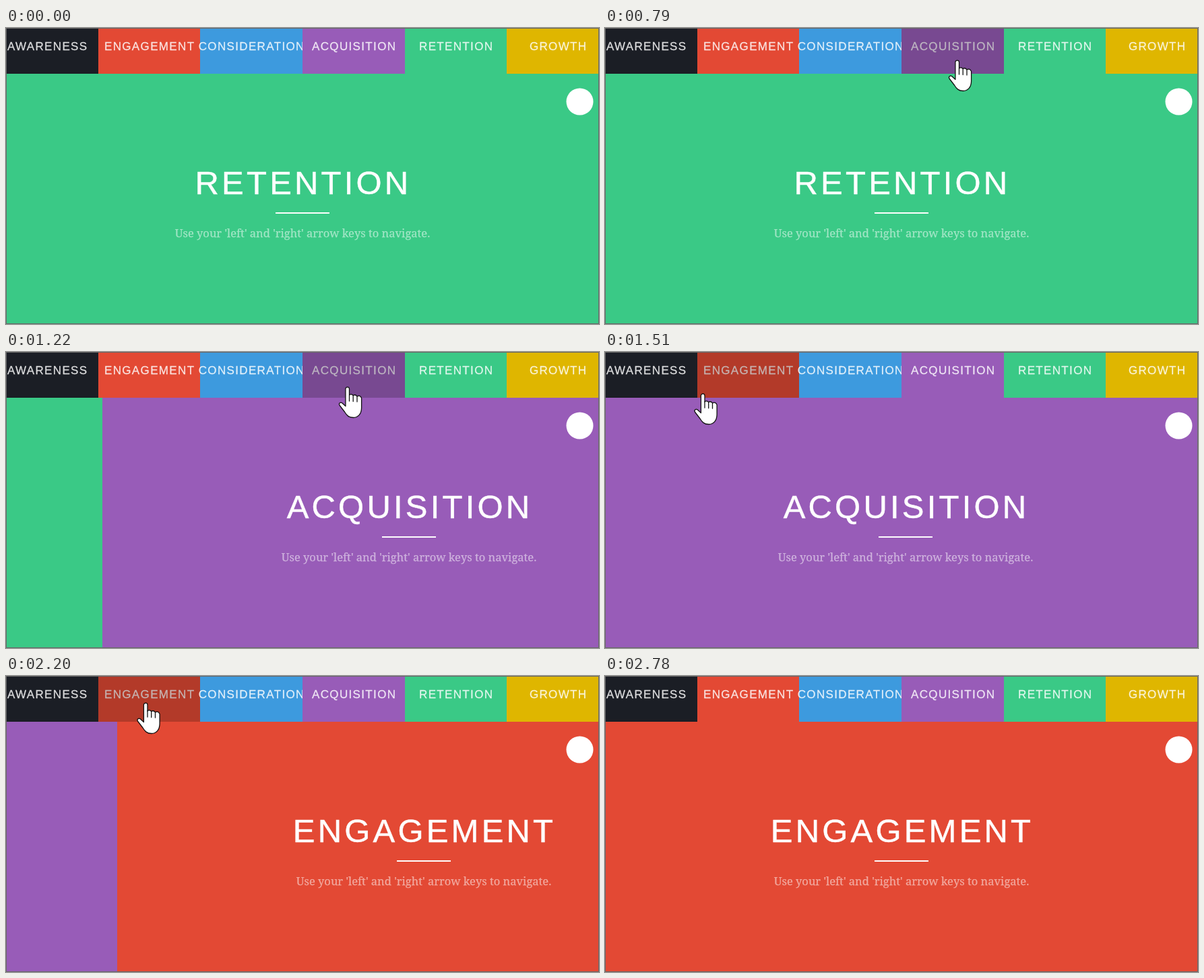
An HTML page for the animation above (3.22 s loop, 880 by 440 pixels).

```html
<!DOCTYPE html>
<html lang="en">
<head>
<meta charset="utf-8">
<title>Sliding sections</title>
<style>
  html, body { margin: 0; width: 100%; height: 100%; overflow: hidden; }
  svg { display: block; }
  text { fill: #fff; stroke: #fff; text-anchor: middle; font-family: "Liberation Sans", Arial, sans-serif; }
  .tab { font-size: 17px; letter-spacing: 1.35px; stroke-width: .3; opacity: .85; }
  .title { font-size: 49px; letter-spacing: 4.2px; stroke-width: .5; }
  .hint { font: 16.5px "Noto Serif", serif; stroke-width: .25; opacity: .53; }
</style>
</head>
<body>
<svg width="880" height="440" viewBox="0 0 880 440">
  <g id="panels"></g>
  <g id="tabs"></g>
  <circle cx="851.5" cy="109.5" r="20" fill="#fff"/>
  <g id="hand" stroke="#111" stroke-width="1.3" stroke-linejoin="round" stroke-linecap="round">
    <path fill="#fff" d="M-2.6 3a2.8 2.8 0 0 1 5.6 0V12q2.7-2.6 5.7.6q3-2.2 5.8 1.2q4.6-2 6.6 2.7V31C21 40 16 45.5 9 45.5C2 45.5-1 42-4 37L-11.3 27.5C-13.5 24-10 22-7.5 24L-2.6 28.5Z"/>
    <path fill="none" d="M3 12v9M8.7 12.6v9M14.5 14v8"/>
  </g>
  <rect x=".5" y=".5" width="879" height="439" fill="none" stroke="#666"/>
</svg>
<script>
const LOOP = 3220, TICK = 142, PHASE = 66;
const PITCH = 910, EDGE = -15, TAB_HEIGHT = 68;
const $ = id => document.getElementById(id);

const tabs = [
  ["AWARENESS", "#1b1e25"],
  ["ENGAGEMENT", "#e34934"],
  ["CONSIDERATION", "#3d9ade"],
  ["ACQUISITION", "#985cb8"],
  ["RETENTION", "#3ac986"],
  ["GROWTH", "#dfb600"]
];
const order = [4, 3, 1];        // tabs in the order they are shown
const clicks = [1047.5, 2053];

// fingertip path: time, x, y
const path = [
  [350, 836, 257], [492, 429, 130], [634, 500, 21], [776, 522.5, 48],
  [1202, 506.5, 52], [1486, 145, 62], [1912, 193, 36],
  [2196, 207, 40], [2338, 225, 22], [2480, 678, 396]
];

const tabLeft = i => Math.round(EDGE + i * PITCH / tabs.length);
const tabAt = (x, y) => y < TAB_HEIGHT ? tabs.findIndex((_, i) => x < tabLeft(i + 1)) : -1;

$("panels").innerHTML = order.map((tab, i) => `
  <g transform="translate(${i * PITCH})">
    <rect x="${EDGE}" width="${PITCH}" height="440" fill="${tabs[tab][1]}"/>
    <text class="title" x="441" y="247">${tabs[tab][0]}</text>
    <rect x="400" y="274" width="80" height="2" fill="#fff"/>
    <text class="hint" x="440" y="311">Use your 'left' and 'right' arrow keys to navigate.</text>
  </g>`).join("");

$("tabs").innerHTML = tabs.map(([label, color], i) => {
  const left = tabLeft(i), right = tabLeft(i + 1);
  const box = `x="${left}" width="${right - left}" height="${TAB_HEIGHT}"`;
  return `<rect ${box} fill="${color}"/>
    <text class="tab" x="${(left + right) / 2 + .7}" y="33">${label}</text>
    <rect class="shade" ${box} fill-opacity=".21"/>`;
}).join("");

const shades = document.querySelectorAll(".shade");

// After a click the remaining distance shrinks to a fifth on every tick.
const slide = age => age < 0 ? 0 : 1 - .2 ** (age / TICK);

function pointerAt(t) {
  const next = path.findIndex(p => p[0] >= t);
  if (next < 0 || t < path[0][0]) return null;
  const [t1, x1, y1] = path[next], [t0, x0, y0] = path[Math.max(next - 1, 0)];
  const k = t1 > t0 ? (t - t0) / (t1 - t0) : 1;
  return [x0 + (x1 - x0) * k, y0 + (y1 - y0) * k];
}

function draw(now) {
  // The picture advances in even ticks, like a screen recording.
  const t = PHASE + Math.floor((now % LOOP - PHASE) / TICK) * TICK;
  const scroll = clicks.reduce((sum, c) => sum + PITCH * slide(t - c), 0);
  const tip = pointerAt(t);
  const hover = tip ? tabAt(...tip) : -1;
  $("panels").setAttribute("transform", `translate(${-Math.round(scroll)})`);
  shades.forEach((shade, i) => shade.style.display = i === hover ? "" : "none");
  $("hand").style.display = tip ? "" : "none";
  if (tip) $("hand").setAttribute("transform", `translate(${tip})`);
}

const start = performance.now();
(function tick() {
  draw(performance.now() - start);
  requestAnimationFrame(tick);
})();
</script>
</body>
</html>
```
